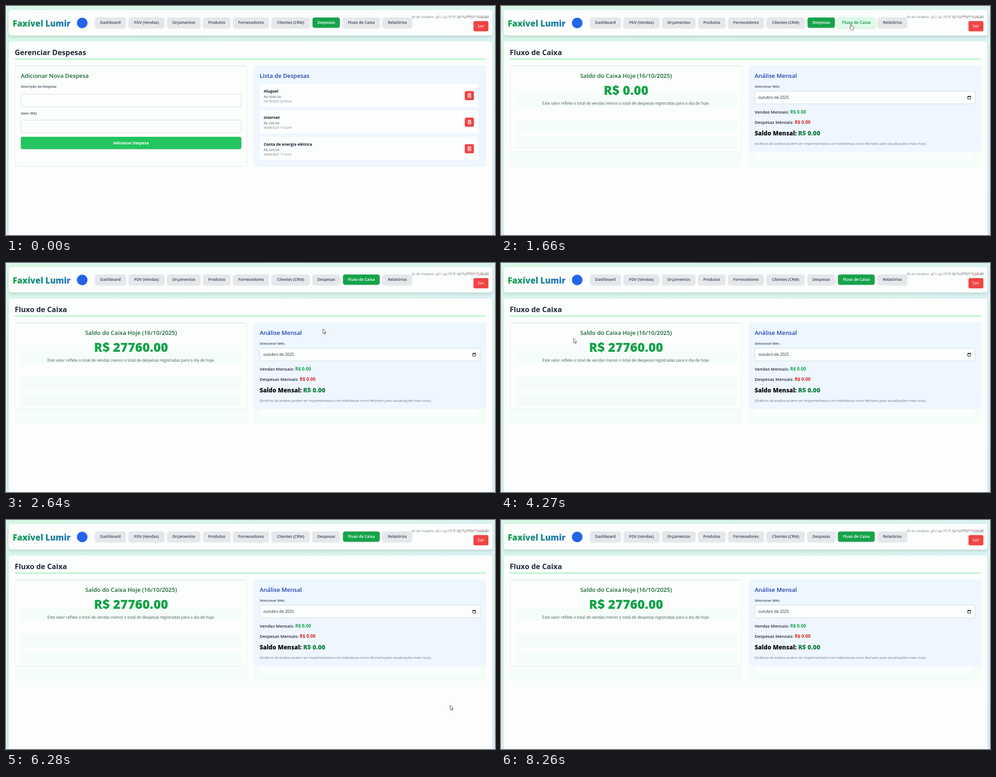
Write an HTML page that moves like this. It is 1091 px wide and 513 px high and loops after 8840 ms.

```html
<!DOCTYPE html>
<html lang="pt-BR">
<head>
<meta charset="utf-8">
<title>Fluxo de Caixa</title>
<style>
  html, body { margin: 0; width: 100%; height: 100%; overflow: hidden; background: #daf5ea; }
  svg { display: block; width: 100%; height: 100%; font-family: "Open Sans", "Noto Sans", sans-serif; }
  .panel { fill: #fcfefd; filter: drop-shadow(0 4px 3px rgba(20, 60, 50, .13)); }
  .raised { filter: drop-shadow(0 1.5px 1.5px rgba(0, 0, 0, .14)); }
  .scaled { transform-box: fill-box; transform-origin: center; }
</style>
</head>
<body>
<svg id="stage" viewBox="0 0 1091 513" xmlns="http://www.w3.org/2000/svg">
  <defs>
    <linearGradient id="sky" x2="1" y2="1">
      <stop stop-color="#d8f7e6"/><stop offset="1" stop-color="#dbeefa"/>
    </linearGradient>
    <linearGradient id="brand" gradientUnits="userSpaceOnUse" x1="15" x2="182" y1="0" y2="0">
      <stop stop-color="#16a34a"/><stop offset="1" stop-color="#2563eb"/>
    </linearGradient>
  </defs>
  <rect width="1091" height="513" fill="url(#sky)"/>
  <rect class="panel" x="6" y="9" width="1079.5" height="57" rx="6"/>
  <rect class="panel" x="6" y="79.5" width="1079.5" height="460" rx="6"/>
  <rect x="19.5" y="118" width="1052" height="1.6" fill="#86efac"/>
  <g id="header"></g>
  <g id="expenses"></g>
  <g id="cashflow"></g>
  <g id="cursor" stroke="#222" stroke-width=".8" stroke-linejoin="round" fill="#fff">
    <path id="arrow" d="M0 0V10.2L2.4 8 4 11.6 5.7 10.9 4.1 7.4H7.2Z"/>
    <path id="hand" d="M-1.1 7.4V.9Q-1.1-.2 0-.2T1.1.9V4.4Q2.2 3.7 2.9 4.7 3.9 4.2 4.5 5.2 6 4.8 6 6.4V9.2Q6 10.8 5 12.8H-.2Q-.8 11.2-2.6 9 -3.9 7.1-2.7 6.6-1.9 6.4-1.1 7.4Z"/>
  </g>
</svg>
<script>
const LOOP = 8840, TICK = 70;
const GRAY = "#e5e7eb", GREEN = "#16a34a", INK = "#374151", TINT = "#f4fdf8", RED = "#ef4444";
const $ = id => document.getElementById(id);

function add(parent, tag, attrs, content) {
  const node = document.createElementNS("http://www.w3.org/2000/svg", tag);
  for (const key in attrs) node.setAttribute(key, attrs[key]);
  if (content) node.textContent = content;
  return parent.appendChild(node);
}
const box = (parent, x, y, width, height, rx, fill, more) =>
  add(parent, "rect", { x, y, width, height, rx, fill, ...more });
const label = (parent, x, y, size, weight, fill, content, anchor = "start") =>
  add(parent, "text", { x, y, "font-size": size, "font-weight": weight, fill, "text-anchor": anchor }, content);
const icon = (parent, d, stroke, width) =>
  add(parent, "path", { d, stroke, fill: "none", "stroke-width": width });

// Each key: [time in ms, properties, easing up to the next key]
function track(node, keys) {
  const frames = keys.map(([ms, props, easing = "linear"]) => ({ ...props, easing, offset: ms / LOOP }));
  if (frames[0].offset > 0) frames.unshift({ ...frames[0], offset: 0 });
  frames.push({ ...frames[frames.length - 1], offset: 1 });
  node.animate(frames, { duration: LOOP, iterations: Infinity });
}
const showDuring = (node, from, to) => track(node,
  [[0, from ? 0 : 1], [from, 1], [to, to < LOOP ? 0 : 1]]
    .map(([ms, opacity]) => [ms, { opacity }, "step-end"]));

// Header
const header = $("header");
label(header, 15, 45.5, 18.5, 800, "url(#brand)", "Faxível Lumir");
add(header, "circle", { cx: 170, cy: 38, r: 11.8, fill: "#2563eb" });

const nav = {};
let left = 199;
for (const [name, width] of Object.entries({
  "Dashboard": 68, "PDV (Vendas)": 79, "Orçamentos": 73.5, "Produtos": 60, "Fornecedores": 79,
  "Clientes (CRM)": 84, "Despesas": 61, "Fluxo de Caixa": 82, "Relatórios": 65
})) {
  const group = add(header, "g", { class: "scaled" });
  nav[name] = {
    group,
    back: box(group, left, 25.7, width, 23, 4.5, GRAY, { class: "raised" }),
    text: label(group, left + width / 2, 40.2, 8.7, 600, INK, name, "middle")
  };
  left += width + 6.9;
}
label(header, 905.5, 26.5, 7.6, 400, "#6b7280", "ID do Usuário:");
const noise = i => Math.abs(Math.sin(i * 12.9898) * 43758.5453) % 1;
for (let i = 0; i < 60; i++) {
  const tone = `hsl(${noise(i) < .5 ? 30 : 215} 14% ${68 + 28 * noise(i + 90)}%)`;
  box(header, 959 + (i >> 1) * 3.95, 21.5 + (i % 2) * 3, 4, 3, 0, tone);
}
box(header, 1043, 33.7, 33.3, 23, 3.5, RED);
label(header, 1059.5, 48.2, 8.6, 400, "#fff", "Sair", "middle");

// Shared page parts
function cards(page, title, height) {
  label(page, 19.5, 110, 16.3, 700, "#1f2937", title);
  box(page, 20, 133.7, 518, height, 5, "#fcfefd", { stroke: "#e6f0ee", "stroke-width": 1.2 });
  box(page, 22, 134, 514, 1.6, 1, "#e8efee");
  box(page, 552.5, 133, 519, height + 1, 5, "#eef6ff");
}
const heading = (page, x, fill, content, anchor) => label(page, x, 161.2, 13, 600, fill, content, anchor);
const caption = (page, x, y, content) => label(page, x, y, 7.5, 600, INK, content);
const field = (page, x, y) =>
  box(page, x, y, 491.5, 28.3, 3, "#fcfefe", { stroke: "#cfd5da", "stroke-width": .9 });

// Expenses page
const expenses = $("expenses");
cards(expenses, "Gerenciar Despesas", 225.5);
heading(expenses, 33, "#166534", "Adicionar Nova Despesa");
["Descrição da Despesa:", "Valor (R$):"].forEach((name, i) => {
  caption(expenses, 33, 182.7 + i * 60, name);
  field(expenses, 33.4, 197.3 + i * 58.3);
});
box(expenses, 33, 293, 492, 27.5, 4, "#22c55e", { class: "raised" });
label(expenses, 279, 310.2, 8.65, 700, "#fff", "Adicionar Despesa", "middle");
heading(expenses, 566, "#1e40af", "Lista de Despesas");
[
  ["Aluguel", "R$ 5000.00", "16/10/2025 22:53:23"],
  ["Internet", "R$ 200.00", "30/08/2025 17:32:45"],
  ["Conta de energia elétrica", "R$ 220.00", "28/08/2025 17:10:57"]
].forEach(([name, amount, date], i) => {
  const row = add(expenses, "g", { transform: `translate(0 ${i * 59.5})` });
  box(row, 566, 174, 487.5, 52.5, 4, "#fcfefe");
  label(row, 575, 193.7, 8.65, 700, "#111827", name);
  label(row, 575, 205.7, 7.6, 400, "#4b5563", amount);
  label(row, 575, 215.8, 6.5, 400, "#6b7280", date);
  box(row, 1023.5, 190.5, 20.5, 20.5, 3.5, RED);
  icon(row, "M1030 197.4h7.8m-5.4-.4v-.8h3v.8m-4.5 1.2v6.8h6v-6.8m-4.1 1v4.4m2.2-4.4v4.4", "#fff", 1.2);
});

// Cash flow page, with the pale remains of the earlier page
const cashflow = $("cashflow");
cards(cashflow, "Fluxo de Caixa", 193);
for (const x of [19.5, 552.5]) box(cashflow, x, 327.5, 519, 32.5, 0, TINT);
box(cashflow, 566, 327.5, 487.5, 18.5, 3, "#fafefc");
for (const y of [197, 256, 293]) box(cashflow, 33, y, 493, 28, 3, TINT);
heading(cashflow, 279, "#166534", "Saldo do Caixa Hoje (16/10/2025)", "middle");
const balance = content => label(cashflow, 279, 198.7, 28, 800, GREEN, content, "middle");
showDuring(balance("R$ 0.00"), 0, 1800);
showDuring(balance("R$ 27760.00"), 1800, LOOP);
label(cashflow, 279, 220.7, 8.66, 400, "#4b5563",
  "Este valor reflete o total de vendas menos o total de despesas registradas para o dia de hoje.", "middle");
heading(cashflow, 566, "#1e40af", "Análise Mensal");
caption(cashflow, 566, 182.7, "Selecionar Mês:");
field(cashflow, 566.4, 190.9);
label(cashflow, 574, 208.3, 8.8, 400, "#1f2937", "outubro de 2025");
icon(cashflow, "M1041.4 202.4h6.4v6.2h-6.4zv1h6.4m-5-2.4v1.4m3.6-1.4v1.4", "#111", 1);

function total(y, size, weight, fill, name, color) {
  const line = label(cashflow, 566, y, size, weight, fill, name + " ");
  add(line, "tspan", { fill: color, "font-size": size * 1.05, "font-weight": Math.max(weight, 700) }, "R$ 0.00");
}
total(241, 9.6, 600, "#1f2937", "Vendas Mensais:", GREEN);
total(263.8, 9.6, 600, "#1f2937", "Despesas Mensais:", "#dc2626");
total(289.6, 13.2, 800, "#0b0f14", "Saldo Mensal:", "#15803d");
label(cashflow, 566, 310.7, 7.55, 400, "#6b7280",
  "(Gráficos de análise podem ser implementados com bibliotecas como Recharts para visualizações mais ricas).");

// Page change and tab states
const HOVER = 1450, SWITCH = 1660, LEAVE = 2080;
showDuring(expenses, 0, SWITCH);
showDuring(cashflow, SWITCH, LOOP);

// Goes through the given values, each change starting at its time
function change(node, prop, first, ...changes) {
  const keys = [[0, { [prop]: first }]];
  let current = first;
  for (const [ms, value] of changes) {
    keys.push([ms, { [prop]: current }, "ease"], [ms + 2 * TICK, { [prop]: value }]);
    current = value;
  }
  track(node, keys);
}
const before = nav["Despesas"], after = nav["Fluxo de Caixa"];
change(before.back, "fill", GREEN, [SWITCH, GRAY]);
change(before.text, "fill", "#fff", [SWITCH, INK]);
change(after.back, "fill", GRAY, [HOVER, "#dcfce7"], [SWITCH, GREEN]);
change(after.text, "fill", INK, [HOVER, "#15803d"], [SWITCH, "#fff"]);
change(after.group, "transform", "scale(1)", [HOVER, "scale(1.055)"], [LEAVE, "scale(1)"]);

// Pointer: each move is a curve with a sideways bend and, if asked, a fading swing
const moves = [
  { start: 610, end: 1250, to: [744.5, 37.5], bend: .18 },
  { start: 1250, end: 1520, to: [781, 40.5] },
  { start: 2010, end: 2570, to: [707, 148] },
  { start: 3240, end: 4270, to: [162, 169], bend: .24 },
  { start: 4270, end: 4470, to: [207, 171] },
  { start: 4800, end: 5650, to: [751, 332] },
  { start: 5720, end: 6210, to: [991, 415], bend: .05 },
  { start: 6480, end: 6550, to: [970, 381] },
  { start: 6880, end: 7720, to: [1033, 408], swing: 60 },
  { start: 8050, end: 8260, to: [1048, 505] }
];
const steps = [];
let [x0, y0] = [1019, 469];
for (const { start, end, to: [x1, y1], bend = 0, swing = 0 } of moves) {
  const dx = x1 - x0, dy = y1 - y0, count = Math.round((end - start) / TICK);
  for (let i = 0; i <= count; i++) {
    const u = i / count, p = u * u * (3 - 2 * u);
    const side = 2 * p * (1 - p) * bend, sway = swing * (1 - u);
    const x = x0 + dx * p - dy * side - sway * Math.sin(4 * Math.PI * u);
    const y = y0 + dy * p + dx * side - 1.3 * sway * Math.sin(6 * Math.PI * u);
    steps.push([start + (end - start) * u, { transform: `translate(${x}px, ${y}px)` }, "step-end"]);
  }
  [x0, y0] = [x1, y1];
}
track($("cursor"), steps);
showDuring($("cursor"), 610, 8260);
showDuring($("hand"), 1240, LEAVE);
track($("arrow"), [[0, 1], [1240, 0], [LEAVE, 1]].map(([ms, opacity]) => [ms, { opacity }, "step-end"]));
</script>
</body>
</html>
```
